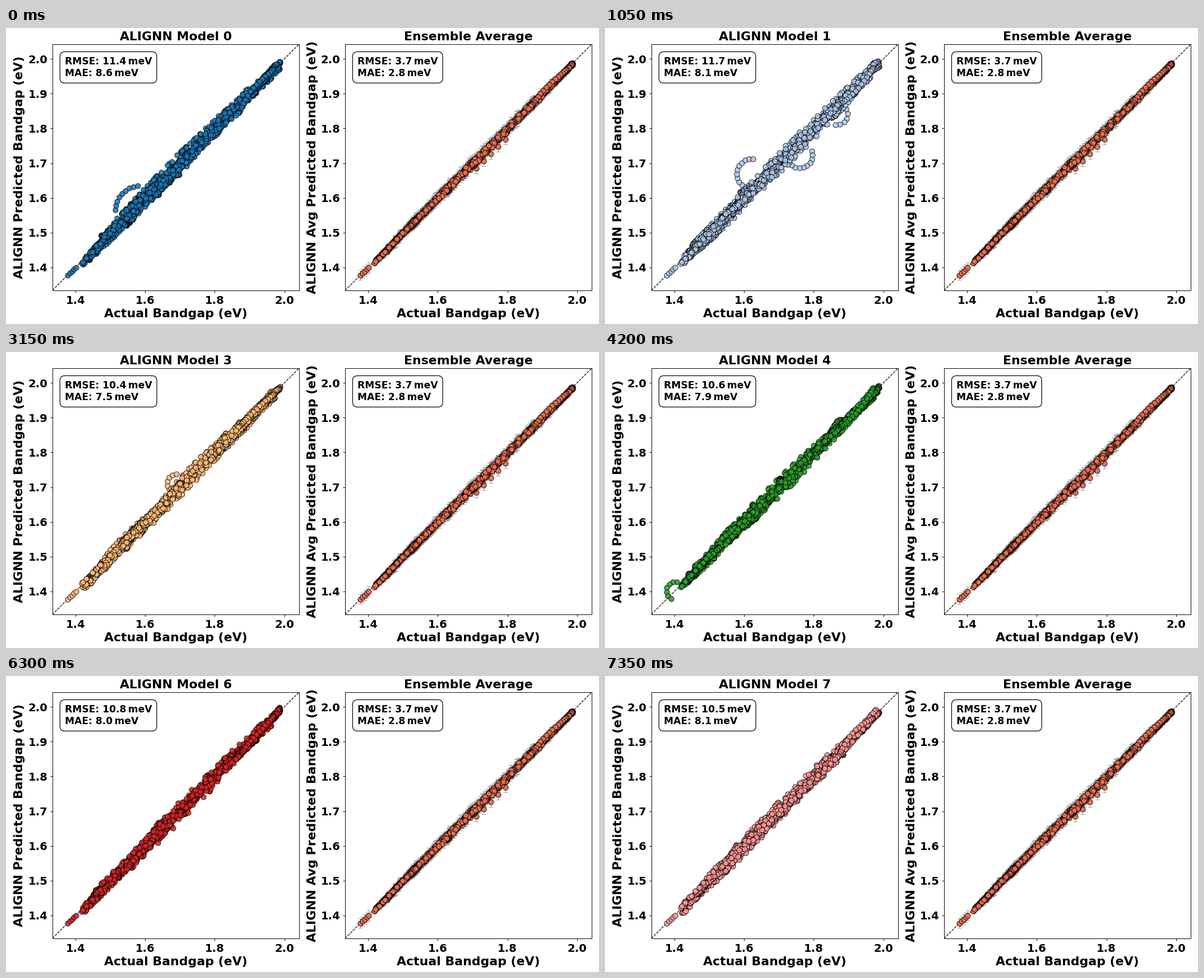
A matplotlib script for the animation above (8000 ms loop, 1058 px wide and 529 px high).

```python
import numpy as np
import matplotlib.pyplot as plt
from matplotlib.animation import FuncAnimation

W, H = 1058, 529
INTERVAL, LOOP, HOLD = 50, 8000, 1050
LIMITS = (1.334, 2.042)
STEPS, TURNS = 18, 110
SPACING = 0.0125

# RMSE and MAE (meV) per model
SCORES = [(11.4, 8.6), (11.7, 8.1), (10.9, 8.2), (10.4, 7.5),
          (10.6, 7.9), (10.6, 8.1), (10.8, 8.0), (10.5, 8.1)]

# Loops that leave the band: centre, radius (eV), start and end angle
LOOPS = {
    0: [(1.585, 1.565, 0.070, 180, 95)],
    1: [(1.622, 1.670, 0.043, 245, 85), (1.760, 1.722, 0.036, 20, -130),
        (1.867, 1.840, 0.030, 30, -100)],
    3: [(1.690, 1.711, 0.027, 220, 90)],
    4: [(1.403, 1.402, 0.026, 80, 240)],
    5: [(1.403, 1.431, 0.026, 270, 110), (1.930, 1.912, 0.028, 50, -95)],
}


def wander(turns, steps):
    """Smooth path that eases from one turning point to the next."""
    t = np.arange((len(turns) - 1) * steps) / steps
    i = t.astype(int)
    w = (1 - np.cos(np.pi * (t - i))) / 2
    return turns[i] * (1 - w) + turns[i + 1] * w


def arc(x, y, r, start, end):
    a0, a1 = np.radians([start, end])
    a = np.linspace(a0, a1, round(abs(a1 - a0) * r / SPACING) + 1)
    return np.c_[x + r * np.cos(a), y + r * np.sin(a)]


def line(x0, y0, x1, y1, n):
    return np.c_[np.linspace(x0, x1, n), np.linspace(y0, y1, n)]


def make_gap():
    """Bandgap swinging back and forth over its whole range."""
    path = wander(np.random.default_rng(4).beta(0.8, 0.8, TURNS), STEPS)
    return np.interp(path, [path.min(), path.max()], [1.418, 1.987])


GAP = make_gap()
SPREAD = 0.45 + 0.55 * np.sin(np.pi * (GAP - 1.4) / 0.6)
TAIL = line(1.378, 1.378, 1.402, 1.400, 5)


def band(rng, rmse):
    """Predictions scattered about the diagonal, with rare large errors."""
    turns = np.clip(rng.standard_t(4, 2 * TURNS - 1), -2.7, 2.7)
    noise = wander(turns, STEPS // 2) * rmse * SPREAD
    bias = np.interp(GAP, [1.418, 1.5], [-0.5, 0]) * rmse
    return np.c_[GAP, GAP + (noise + bias) / 1000]


def model_points(k):
    loops = [arc(*loop) for loop in LOOPS.get(k, [])]
    bent_tail = any(pts[:, 0].min() < 1.4 for pts in loops)
    parts = loops if bent_tail else [TAIL] + loops
    return np.vstack(parts + [band(np.random.default_rng(20 + k), SCORES[k][0])])


def ensemble_points():
    rng = np.random.default_rng(7)
    strays = line(1.711, 1.685, 1.794, 1.768, 5)
    err = wander(rng.gamma(4, 2.2, 2 * TURNS - 1), STEPS // 2) * SPREAD + 3
    pts = np.vstack([TAIL, strays, band(rng, 3.7)])
    return pts, np.r_[np.full(len(TAIL) + len(strays), 14), err] / 1000


def stats(rmse, mae):
    return f"RMSE: {rmse}\u2009meV\nMAE: {mae}\u2009meV"


def panel(left, title, ylabel):
    ax = fig.add_axes([left / W, 1 - 469 / H, 440 / W, 440 / H])
    ax.set(xlim=LIMITS, ylim=LIMITS,
           xticks=np.arange(1.4, 2.01, 0.2), yticks=np.arange(1.4, 2.01, 0.1))
    ax.tick_params(labelsize=16)
    ax.plot(LIMITS, LIMITS, "k--", lw=1, zorder=1)
    ax.set_title(title, fontsize=18)
    ax.set_xlabel("Actual Bandgap (eV)", fontsize=18)
    ax.set_ylabel(ylabel, fontsize=18)
    note = ax.text(0.05, 0.95, "", transform=ax.transAxes, va="top",
                   fontsize=14, zorder=5,
                   bbox=dict(boxstyle="round,pad=0.5", fc="white", ec="black"))
    return ax, note


plt.rcParams.update({"font.family": "DejaVu Sans", "font.weight": "bold",
                     "axes.titleweight": "bold", "axes.labelweight": "bold"})
fig = plt.figure(figsize=(12, 6), dpi=W / 12, facecolor="white")
DOT = dict(marker="o", ls="", ms=7.5, mec="black", mew=0.75, zorder=3)

left_ax, left_note = panel(82.8, "", "ALIGNN Predicted Bandgap (eV)")
dots, = left_ax.plot([], [], alpha=0.88, **DOT)

right_ax, right_note = panel(605, "Ensemble Average",
                             "ALIGNN Avg Predicted Bandgap (eV)")
avg, err = ensemble_points()
right_ax.errorbar(*avg.T, yerr=err, ls="", ecolor="#a3a3a3", elinewidth=0.9,
                  capsize=3, capthick=0.9, zorder=2)
right_ax.plot(*avg.T, mfc="#e76f51", alpha=0.95, **DOT)
right_note.set_text(stats(3.7, 2.8))

clouds = [model_points(k) for k in range(len(SCORES))]
colors = plt.get_cmap("tab20").colors


def update(i):
    k = i * INTERVAL // HOLD
    dots.set_data(*clouds[k].T)
    dots.set_markerfacecolor(colors[k])
    left_ax.title.set_text(f"ALIGNN Model {k}")
    left_note.set_text(stats(*SCORES[k]))
    return dots, left_note


anim = FuncAnimation(fig, update, frames=LOOP // INTERVAL, interval=INTERVAL,
                     repeat=True, repeat_delay=0)
plt.show()
```
